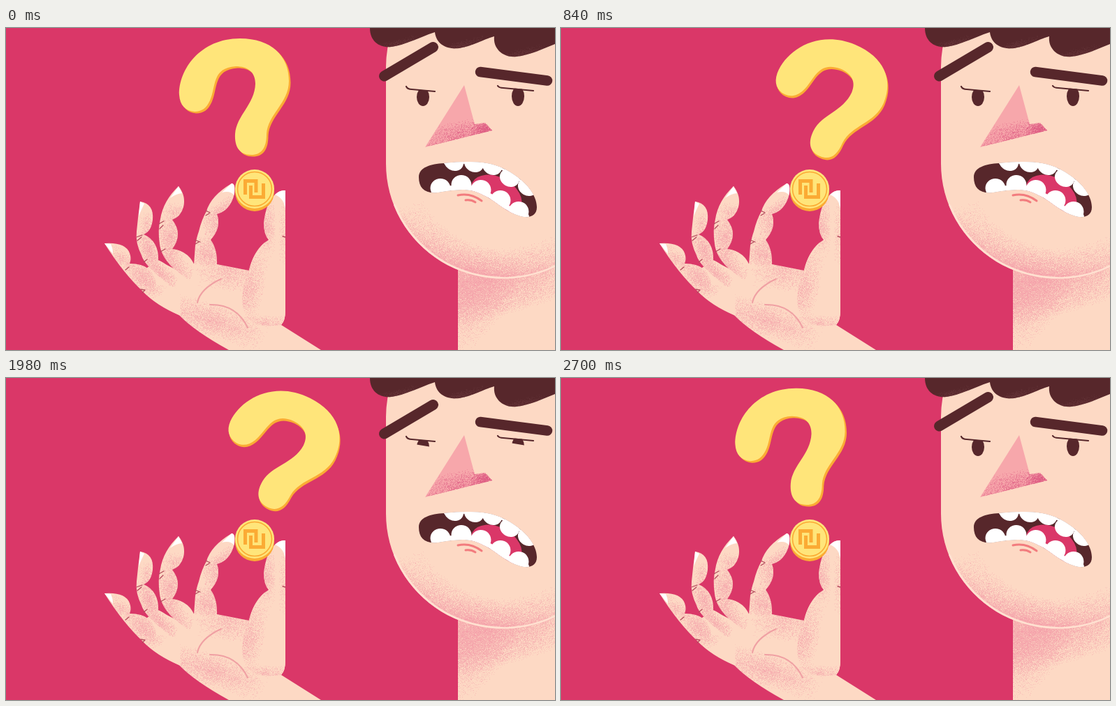
Write an HTML page with a canvas that moves like this. It is 786 px wide and 462 px high and loops after 2.76 s.

```html
<!DOCTYPE html>
<html>
<head>
<meta charset="utf-8">
<style>
  html, body { margin: 0; width: 100%; height: 100%; overflow: hidden; background: #da3768; }
  canvas { display: block; }
</style>
</head>
<body>
<canvas id="stage" width="786" height="462"></canvas>
<script>
const stage = document.getElementById('stage');
const backdrop = stage.cloneNode();
let ctx = backdrop.getContext('2d');

const SKIN = '#fdd9c4', BLUSH = '#f59fa8', DARK = '#57272b', RED = '#da3768';
const YELLOW = '#ffe57a', ORANGE = '#fbab34', WHITE = '#fff';
const LOOP = 2760, STEP = 60;

let seed = 7;
const rnd = () => (seed = seed * 16807 % 2147483647) / 2147483647;

function fill(color, d) {
  ctx.fillStyle = color;
  ctx.fill(new Path2D(d));
}

function line(color, width, d, cap = 'round') {
  ctx.strokeStyle = color;
  ctx.lineWidth = width;
  ctx.lineCap = cap;
  ctx.stroke(new Path2D(d));
}

function oval(color, x, y, rx, ry = rx, angle = 0) {
  ctx.fillStyle = color;
  ctx.beginPath();
  ctx.ellipse(x, y, rx, ry, angle, 0, 7);
  ctx.fill();
}

function clipped(d, draw) {
  ctx.save();
  ctx.clip(new Path2D(d));
  draw();
  ctx.restore();
}

// Stippled shading: n faint dots placed by a rule, kept inside a shape.
function stipple(d, color, n, place) {
  clipped(d, () => {
    ctx.fillStyle = color;
    ctx.globalAlpha = 0.28;
    while (n-- > 0) {
      const [x, y] = place();
      ctx.fillRect(x | 0, y | 0, 1, 1);
    }
  });
}

// Soft rotated patch, densest in the middle.
const patch = (x, y, rx, ry, degrees = 0) => () => {
  const u = (rnd() + rnd() - 1) * rx, v = (rnd() + rnd() - 1) * ry;
  const a = degrees * Math.PI / 180;
  return [x + u * Math.cos(a) - v * Math.sin(a), y + u * Math.sin(a) + v * Math.cos(a)];
};

function drawHead() {
  const neck = 'M647 335H786V462H647Z';
  fill(SKIN, neck);
  stipple(neck, BLUSH, 44000, patch(690, 355, 150, 62, -16));
  stipple(neck, BLUSH, 8000, patch(660, 390, 75, 55, -45));

  const face = 'M553 0Q544 30 544 56V195A168 165 0 0 0 786 343V0Z';
  fill(SKIN, face);
  stipple(face, BLUSH, 17000, () => {
    const a = Math.PI * (0.27 + 0.6 * (rnd() + rnd()) / 2), r = 1 - 0.27 * rnd() * rnd();
    return [712 + 168 * r * Math.cos(a), 195 + 165 * r * Math.sin(a)];
  });
  clipped(face, () => line('#ffe0d0', 5, 'M556 255A168 165 0 0 0 786 343'));

  const hair = 'M521 0C521 20 536 29 552 27C570 25 590 14 614 6C616 24 632 31 649 29' +
    'C668 26 682 17 699 12C697 30 712 43 731 41C750 39 768 30 786 23V0Z';
  fill(DARK, hair);
  for (const [x, y] of [[560, 24], [652, 26], [736, 38]])
    stipple(hair, '#6d3b3d', 700, patch(x, y, 40, 8, -15));

  line(DARK, 14.5, 'M679 63L775 75.5');
  const nose = 'M656 82L671 138L686 136L696 147L600 171Z';
  fill('#f7a7ab', nose);
  stipple(nose, '#d9557f', 4600, patch(650, 163, 66, 30, -14));
  stipple(nose, '#d9557f', 1700, patch(686, 146, 22, 14));
}

function drawMouth() {
  const mouth = 'M591 214C591 200 608 195 627 194C660 191 690 190 715 203' +
    'C745 219 760 240 760 257C760 268 752 272 742 271C715 266 705 249 680 238' +
    'C660 228 640 233 618 236C600 238 591 230 591 214Z';
  fill(DARK, mouth);
  clipped(mouth, () => {
    oval(RED, 702, 240, 39, 26, 0.5);
    line(WHITE, 14, 'M742 271C715 266 705 249 680 238C660 228 640 233 616 236');
    line(WHITE, 6, 'M630 193C660 191 690 190 715 203Q744 219 754 236');
    const lower = [[622, 230], [652, 225], [680, 232], [708, 247], [734, 263]];
    const upper = [[641, 192], [670, 194], [696, 198], [721, 215], [747, 228]];
    for (const [x, y] of lower) oval(WHITE, x, y, 14.5, 14, 0.4);
    for (const [x, y] of upper) oval(WHITE, x, y, 14.5, 12.5, 0.5);
  });
  line('#f27c7e', 3, 'M647 240Q665 236 681 248M658 247Q666 246 672 250');
}

function drawHand() {
  const palm = 'M196 378L202 344L217 333L240 345L270 338Q285 342 302 339L348 348' +
    'Q356 316 376 304Q369 296 369 280Q372 252 384 240Q392 232 400 233' +
    'V405Q400 420 394 426L451 462H319Q270 435 248 412Q215 398 196 378Z';
  const index = 'M269 340L271 312Q273 300 276 292Q280 275 287 263Q293 241 323 223Q329 223 327 238' +
    'Q321 262 302 267Q309 286 293 304Q303 317 302 342Z';
  const middle = 'M240 345Q222 328 220 310Q217 290 221 274Q225 248 247 227Q258 241 254 257' +
    'Q250 271 238 275Q254 296 238 317Q264 320 272 346L262 362Z';
  const ring = 'M226 362Q198 340 194 326Q185 308 187 292Q189 270 192 249Q212 252 210 275' +
    'Q208 292 197 296Q219 306 218 333Q235 340 246 360L240 375Z';
  const pinky = 'M141 309Q171 307 177 323Q180 331 177 338Q213 338 215 369Q235 368 249 375' +
    'L250 413Q215 397 196 378Q168 352 141 309Z';
  const mound = 'M348 347Q330 390 345 415Q360 432 394 426Q400 420 400 405V300L370 308Q354 322 348 347Z';

  fill(SKIN, palm);
  stipple(palm, BLUSH, 4600, patch(295, 420, 80, 24, 18));
  stipple(palm, BLUSH, 2600, patch(322, 348, 52, 30, 8));
  fill(SKIN, mound);
  stipple(mound, BLUSH, 2800, patch(346, 375, 24, 62, 12));
  stipple(mound, BLUSH, 800, patch(370, 424, 40, 12));
  stipple(palm, BLUSH, 1400, patch(372, 285, 15, 40));
  stipple(palm, BLUSH, 400, patch(399, 295, 9, 50));

  fill(SKIN, index);
  stipple(index, BLUSH, 1900, patch(290, 325, 28, 26));
  stipple(index, BLUSH, 1000, patch(298, 282, 17, 28));
  stipple(index, BLUSH, 500, patch(312, 257, 24, 10, -40));
  fill(SKIN, middle);
  stipple(middle, BLUSH, 2000, patch(236, 302, 20, 34));
  stipple(middle, BLUSH, 1500, patch(240, 340, 34, 18, 45));
  stipple(middle, BLUSH, 450, patch(242, 265, 18, 14));
  fill(SKIN, ring);
  stipple(ring, BLUSH, 1600, patch(205, 318, 16, 30, -20));
  stipple(ring, BLUSH, 1500, patch(220, 352, 34, 15, 40));
  stipple(ring, BLUSH, 350, patch(202, 282, 12, 18));
  fill(SKIN, pinky);
  stipple(pinky, BLUSH, 1900, patch(198, 360, 34, 18, 45));
  stipple(pinky, BLUSH, 500, patch(167, 332, 24, 11, 40));

  fill(WHITE, 'M141 309L150 310Q153 316 153 324Z');
  fill(WHITE, 'M192 249L198 252Q194 260 190 270Z');
  fill(WHITE, 'M247 227L252 237Q243 238 235 244Z');
  fill(WHITE, 'M323 223Q329 223 326 240Q322 233 309 236Z');
  fill(WHITE, 'M400 233Q392 232 385 239Q398 244 400 260Z');

  line('#f0a0a3', 2, 'M274 394Q278 374 308 360M292 397Q330 396 346 430');
  line('#b34a5c', 1.3, 'M187 300l8 -3M188 305l6 -5M197 336l5 -4M219 281l7 -4M220 288l5 -5' +
    'M221 321l7 -4M286 262l6 3M286 269l5 -3M270 304l8 3M271 310l5 -3' +
    'M171 347l5 -4M193 375l6 1M195 380l4 -4M396 299l4 1');
}

function drawCoin() {
  oval(ORANGE, 356, 235, 28);
  oval(YELLOW, 356, 231, 28);
  ctx.strokeStyle = ORANGE;
  ctx.lineWidth = 1.6;
  ctx.beginPath();
  ctx.arc(356, 231, 24.5, 0, 7);
  ctx.stroke();
  line(ORANGE, 5, 'M342.5 239V219.5H358V236M350.5 226V242.5H368.5V223', 'butt');
}

function drawQuestion(turn) {
  const mark = 'M248 96C247 60 278 15 335 15C380 15 405 40 405 76C405 108 375 123 373 152' +
    'C373 172 366 182 351 182C334 182 327 170 328 152C330 125 356 110 357 80' +
    'C357 63 346 55 329 55C294 57 301 85 292 104C287 115 280 120 270 120C257 119 249 111 248 96Z';
  ctx.save();
  ctx.translate(356, 232);
  ctx.rotate(turn * Math.PI / 180);
  ctx.translate(-353.5, -229.5);
  fill(ORANGE, mark);
  ctx.translate(-2.5, -2.5);
  fill(YELLOW, mark);
  ctx.restore();
}

function drawEye(x, y, ry, top, bottom) {
  clipped(`M${x - 12} ${top - 1}L${x + 12} ${top + 1}V${bottom + 2}L${x - 12} ${bottom - 2}Z`,
    () => oval(DARK, x, y, 9, ry));
}

const ease = u => {
  u = Math.min(1, Math.max(0, u));
  return u * u * (3 - 2 * u);
};

// Eased move from 0 to 1 between two times.
const move = (t, from, to) => ease((t - from) / (to - from));
const swing = t => move(t, 0, 640) - move(t, 640, 1380) + move(t, 1380, 2060) - move(t, 2060, LOOP);
const squint = t => move(t, 1260, 1860) - move(t, 2100, 2700);

function render(now) {
  const t = Math.floor(now % LOOP / STEP) * STEP;
  const s = squint(t), drop = 11 * s;
  ctx.drawImage(backdrop, 0, 0);
  drawQuestion(28 * swing(t));
  drawEye(597, 99, 13, 89, 115 - 18 * s);
  drawEye(733, 98, 14, 87, 114 - 19 * s);
  line(DARK, 2.2, 'M573 84Q575 88 581 88L614 91M704 83Q706 86 712 86L755 90');
  line(DARK, 15, `M541.5 ${69 + drop}L611.5 ${27.5 + drop}`);
  requestAnimationFrame(render);
}

fill(RED, 'M0 0H786V462H0Z');
drawHead();
drawMouth();
drawHand();
drawCoin();
ctx = stage.getContext('2d');
render(performance.now());
</script>
</body>
</html>
```
